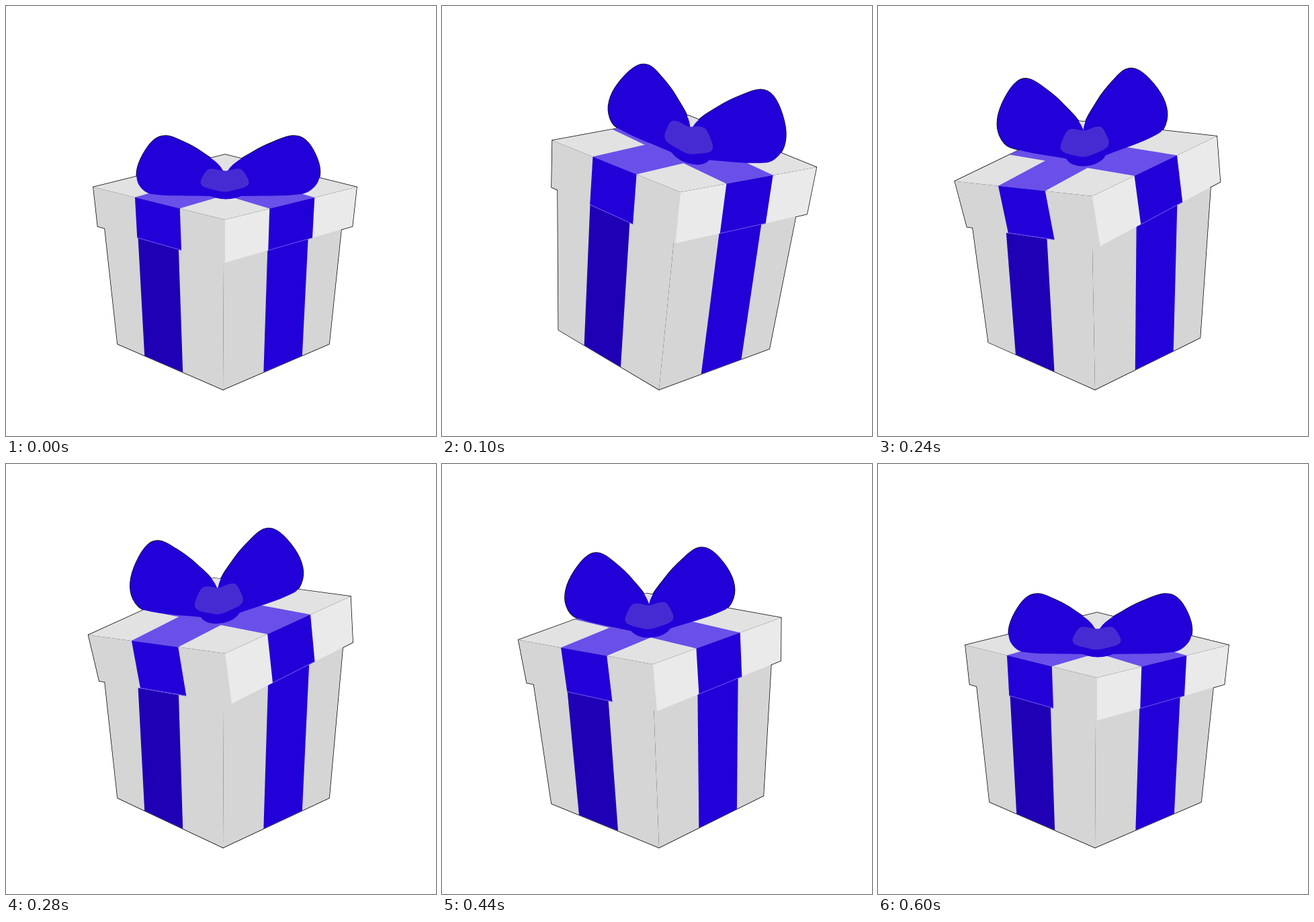
Recreate the animation shown at these times as an HTML page with a canvas. Size 640x640 px, loop 1200 ms.

```html
<!DOCTYPE html>
<html lang="en">
<head>
<meta charset="utf-8">
<title>Shaking gift</title>
<style>
html, body { margin: 0; height: 100%; overflow: hidden; background: #fff; }
canvas { display: block; width: 100vmin; height: 100vmin; }
</style>
</head>
<body>
<canvas id="stage" width="640" height="640"></canvas>
<script>
const ctx = document.getElementById('stage').getContext('2d');
const BLUE = '#2200d8', DARK = '#1f00b5', LIGHT = '#6a50e9', KNOT = '#472bd2';
const FOOT = [323, 571];

// time, sideways shift, rise and roll of the lid, tilt and fold of the bow
const keys = [
  [0, 0, 0, 0, 0, 0],
  [100, 29, 41, -40, 58, 23],
  [180, -20, 34, 10, 61, 40],
  [210, -31, 35, 38, 19, 43],
  [240, -7, 35, 67, -23, 45],
  [340, 2, 36, 36, -23, 22],
  [440, -12, 20, 33, -12, 45],
  [600, 0, 0, 0, 0, 0]
];

// Left loop at rest, seen from the knot; the right one has the same form
const loopShape = [[-3, -15], [-35, -42], [-63, -57], [-87, -65], [-105, -59], [-122, -37],
  [-131, -12], [-127, 8], [-110, 20], [-22, 23], [1, 24]];
const loopTop = [-97, -64], loopBase = [-122, 15];

const halfKnot = [[0, -14], [16, -17], [25, -16], [32, -7], [36, 3], [32, 9], [16, 14], [0, 17]];
const knotShape = [...halfKnot, ...halfKnot.slice(1, -1).reverse().map(([x, y]) => [-x, y])];
const underKnot = Array.from({ length: 12 }, (_, i) =>
  [2 + 30 * Math.cos(i * Math.PI / 6), 14 + 14 * Math.sin(i * Math.PI / 6)]);

const lerp = (p, q, t) => [p[0] + (q[0] - p[0]) * t, p[1] + (q[1] - p[1]) * t];
const add = (p, x, y) => [p[0] + x, p[1] + y];
const sub = (p, q) => [p[0] - q[0], p[1] - q[1]];
const cross = (p, q) => p[0] * q[1] - p[1] * q[0];
const onLine = (p, q, x) => lerp(p, q, (x - p[0]) / (q[0] - p[0]));

// Cubic Hermite through all keys, at rest at both ends
function poseAt(t) {
  const last = keys.length - 1;
  const k = Math.min(last - 1, keys.findLastIndex(key => key[0] <= t));
  const span = keys[k + 1][0] - keys[k][0], s = Math.min(1, (t - keys[k][0]) / span);
  return keys[k].slice(1).map((a, i) => {
    const slope = j => j === 0 || j === last ? 0 :
      (keys[j + 1][i + 1] - keys[j - 1][i + 1]) / (keys[j + 1][0] - keys[j - 1][0]) * span;
    return a + (keys[k + 1][i + 1] - a) * s * s * (3 - 2 * s)
      + slope(k) * s * (1 - s) ** 2 - slope(k + 1) * s * s * (1 - s);
  });
}

function poly(...pts) {
  const path = new Path2D();
  pts.forEach(p => path.lineTo(...p));
  path.closePath();
  return path;
}

// Closed curve through the points
function smooth(pts) {
  const path = new Path2D(), n = pts.length, at = i => pts[(i + n) % n];
  path.moveTo(...pts[0]);
  for (let i = 0; i < n; i++) {
    const d = sub(at(i + 1), at(i - 1)), e = sub(at(i + 2), at(i));
    const p = at(i), q = at(i + 1), len = Math.hypot(...sub(q, p)) / 3;
    const f = len / Math.hypot(...d), g = len / Math.hypot(...e);
    path.bezierCurveTo(...add(p, d[0] * f, d[1] * f), ...add(q, -e[0] * g, -e[1] * g), ...q);
  }
  path.closePath();
  return path;
}

// Loop stretched so that its two outer corners meet top and base
function loop(knot, top, base) {
  const det = cross(loopTop, loopBase);
  return smooth(loopShape.map(p => {
    const u = cross(p, loopBase) / det, v = cross(loopTop, p) / det;
    return add(knot, u * top[0] + v * base[0], u * top[1] + v * base[1]);
  }));
}

// Strip between two edges, from share a..b of the first to c..d of the second
const band = (p, q, a, b, r, s, c, d) =>
  poly(lerp(p, q, a), lerp(p, q, b), lerp(r, s, d), lerp(r, s, c));

function fill(path, color) {
  ctx.fillStyle = color;
  ctx.fill(path);
}

function line(p, q) {
  ctx.strokeStyle = LIGHT;
  ctx.lineWidth = 0.7;
  ctx.stroke(poly(p, q));
}

function draw(t) {
  const [shift, rise, roll, tilt, fold] = poseAt(t);

  // Lid: left, front, right and back corner, then its rim
  const B = [326 + shift, 318 - rise], depth = 48.5 + 0.21 * rise;
  const A = add(B, -196 - 0.13 * roll, roll / 2 - depth);
  const C = add(B, 196 - 0.16 * roll, -roll / 2 - depth);
  const D = add(A, ...sub(C, B));
  const lean = 0.17 * roll - 0.03 * shift, drop = 64 + 0.3 * rise;
  const a = add(A, lean + 6.5, drop * 0.915);
  const b = add(B, lean, drop);
  const c = add(C, lean - 6.5, drop * 0.915);

  // Body: upper and lower corners
  const sway = 0.72 * shift;
  const l = onLine(a, b, 147 + 1.2 * sway);
  const f = [324 + sway, b[1] - 1];
  const r = onLine(b, c, 499 + 1.2 * sway + 0.06 * rise);
  const L = [166 + 0.35 * sway, 503 - 0.165 * rise - 0.675 * sway];
  const R = [481 + 0.3 * sway, 503 - 0.165 * rise + 0.675 * sway];

  // Bow
  const mid = lerp(A, C, 0.5);
  const knot = add(mid, 0.1 * rise - 0.07 * roll - 0.5, 0.12 * shift - 0.38 * rise - 10);
  const topX = 7.5 + 0.2 * tilt - 0.22 * roll - 0.1 * shift, baseX = 3.5 - 0.07 * roll;
  const baseY = 15 - 0.6 * fold, topY = baseY - 80.5 - 0.3 * rise;
  const loops = [-1, 1].map(side => loop(knot,
    [topX + side * (104.5 - fold / 2), topY + side * 0.35 * tilt],
    [baseX + side * (125.5 - fold / 10), baseY + side * tilt / 2]));
  const [centre, under] = [knotShape, underKnot].map(shape => smooth(shape.map(([x, y]) =>
    add(knot, x, y * (1 + 0.0075 * rise) + x * tilt / 250))));

  const body = [poly(l, B, f, FOOT, L), poly(f, B, r, R, FOOT)];
  const lid = [poly(A, B, b, a), poly(B, C, c, b), poly(A, B, C, D)];

  ctx.fillStyle = '#fff';
  ctx.fillRect(0, 0, 640, 640);
  ctx.strokeStyle = '#000';
  ctx.lineWidth = 1.5;
  ctx.lineJoin = 'round';
  [...body, ...lid, ...loops].forEach(p => ctx.stroke(p));

  body.forEach(p => fill(p, '#d5d5d5'));
  fill(band(l, f, 0.28, 0.621, L, FOOT, 0.256, 0.619), DARK);
  fill(band(f, r, 0.373, 0.718, FOOT, R, 0.382, 0.746), BLUE);

  ['#d5d5d5', '#eaeaea', '#e2e2e2'].forEach((color, i) => fill(lid[i], color));
  fill(band(A, B, 0.316, 0.657, D, C, 0.24, 0.57), LIGHT);
  fill(band(B, C, 0.338, 0.68, A, D, 0.44, 0.77), LIGHT);
  fill(band(A, B, 0.316, 0.657, a, b, 0.31, 0.657), BLUE);
  fill(band(B, C, 0.338, 0.68, b, c, 0.339, 0.686), BLUE);
  line(lerp(a, b, 0.31), lerp(a, b, 0.657));
  line(lerp(b, c, 0.339), lerp(b, c, 0.686));

  [...loops, under].forEach(p => fill(p, BLUE));
  fill(centre, KNOT);
}

const start = performance.now();
function tick(now) {
  const t = Math.max(0, now - start) % 1200;
  draw(Math.floor(t / 20) * 20);
  requestAnimationFrame(tick);
}
draw(0);
requestAnimationFrame(tick);
</script>
</body>
</html>
```
